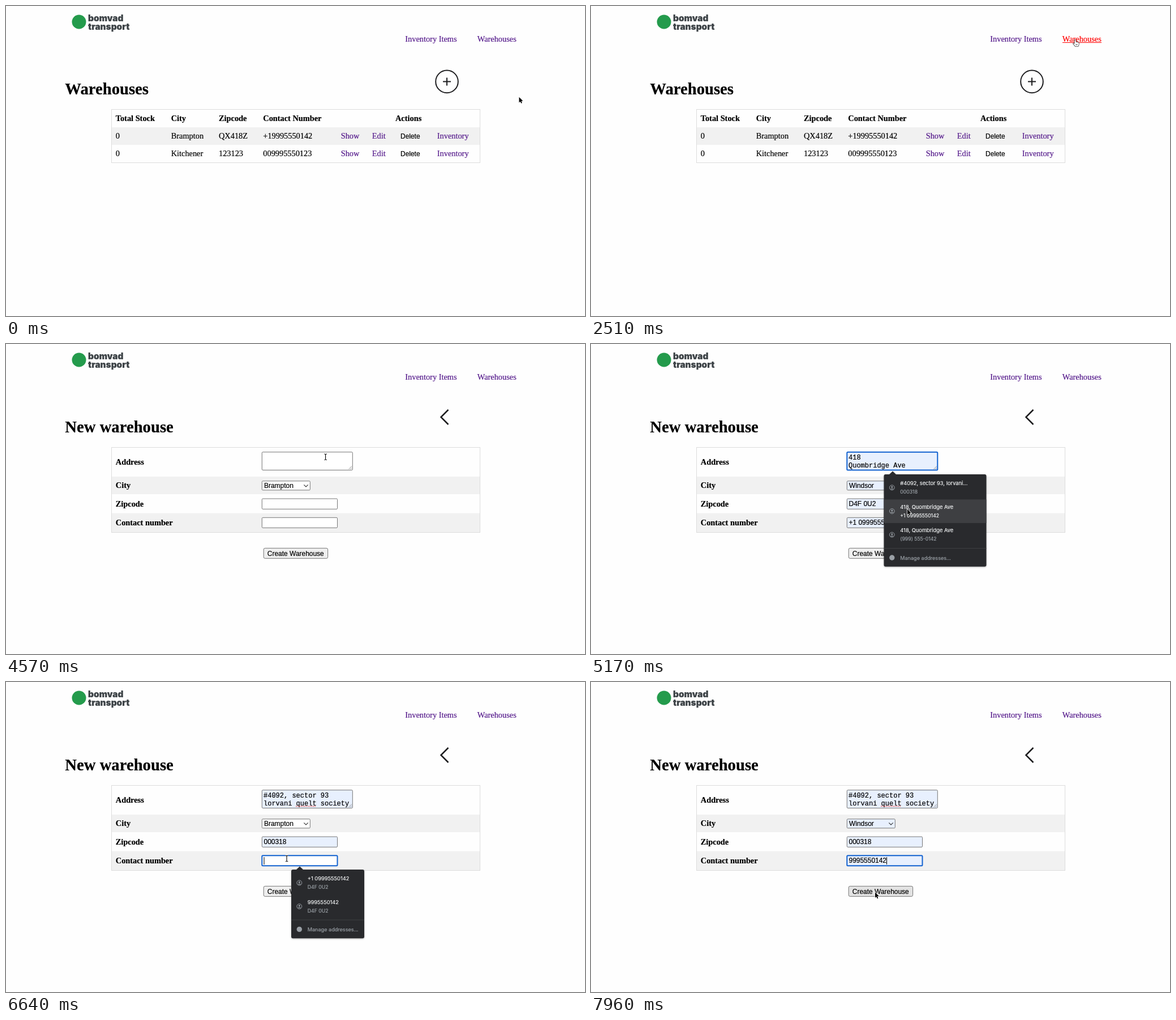
Write an HTML page with a canvas that moves like this. It is 1023x547 px and loops after 8 s.

```html
<!DOCTYPE html>
<html lang="en">
<head>
<meta charset="utf-8">
<title>Warehouses</title>
<style>
  html, body { margin: 0; width: 100%; height: 100%; overflow: hidden; background: #fefefe; }
  canvas { display: block; width: 1023px; height: 547px; }
</style>
</head>
<body>
<canvas id="stage" width="1023" height="547"></canvas>
<script>
const ctx = document.getElementById('stage').getContext('2d');
const LOOP = 8000;

const SERIF = '"Liberation Serif", "Times New Roman", serif';
const SANS = '"Liberation Sans", Arial, sans-serif';
const MONO = '"Liberation Mono", "Courier New", monospace';
const UI = 'Inter, Roboto, sans-serif';
const BODY = `14.35px ${SERIF}`;
const BOLD = `bold 14.35px ${SERIF}`;
const HEAD = `bold 28.7px ${SERIF}`;
const CONTROL = `11.96px ${SANS}`;
const CODE = `12px ${MONO}`;
const MARK = `900 15.4px ${UI}`;

const PURPLE = '#551a8b', GREY = '#9aa0a6', FILLED = '#e8f0fe', RING = '#1262d0', EDGE = '#767676';

// When things happen, in ms
const AT = {
  hand: 2070, linkHot: 2510, linkCool: 2655, form: 3840, focusAddress: 4723, popAddress: 4870,
  pickAddress: 6050, focusPhone: 6491, popPhone: 6640, pickPhone: 7522
};

// Cursor travel: start, end, number of steps, then a path of two or three points
const moves = [
  [900, 1920, 8, [906.5, 160.7], [776, 100], [855.5, 59.5]],
  [2655, 3090, 4, [855.5, 59.5], [776, 132.5]],
  [3987, 4576, 5, [776, 132.5], [540, 207]],
  [5020, 5166, 2, [540, 207], [559, 291.5]],
  [5312, 5750, 4, [559, 291.5], [551, 267]],
  [6197, 6491, 3, [551, 267], [496, 311.5]],
  [6787, 7080, 3, [496, 311.5], [530, 358]],
  [7230, 7376, 2, [530, 358], [528, 394]],
  [7668, 7960, 3, [528, 394], [502, 371]]
];

const people = [
  { title: '#4092, sector 93, lorvani...', note: '000318', lines: ['#4092, sector 93', 'lorvani quelt society'],
    city: 'Brampton', zip: '000318', phone: '' },
  { title: '418, Quombridge Ave', note: '+1 09995550142', lines: ['418', 'Quombridge Ave'],
    city: 'Windsor', zip: 'D4F 0U2', phone: '+1 09995550142' },
  { title: '418, Quombridge Ave', note: '(999) 555-0142', lines: ['418', 'Quombridge Ave'],
    city: 'Windsor', zip: 'D4F 0U2', phone: '(999) 555-0142' }
];
const phones = [
  { title: '+1 09995550142', note: 'D4F 0U2' },
  { title: '9995550142', note: 'D4F 0U2' }
];
const addressPop = { x: 517.5, y: 230, w: 181, tip: 533, items: people };
const phonePop = { x: 504, y: 331, w: 129, tip: 519, items: phones };
const ITEM = 41.6;

// The hairline stroke gives the slightly heavier look of smoothed type
function text(str, x, y, font, color = '#000', align = 'left') {
  ctx.font = font;
  ctx.fillStyle = ctx.strokeStyle = color;
  ctx.textAlign = align;
  ctx.lineWidth = 0.2;
  ctx.fillText(str, x, y);
  ctx.strokeText(str, x, y);
}

function rect(x, y, w, h, color) {
  ctx.fillStyle = color;
  ctx.fillRect(x, y, w, h);
}

function line(points, color, width) {
  ctx.beginPath();
  points.forEach(([x, y]) => ctx.lineTo(x, y));
  ctx.strokeStyle = color;
  ctx.lineWidth = width;
  ctx.stroke();
}

function disc(x, y, r, color) {
  ctx.beginPath();
  ctx.arc(x, y, r, 0, Math.PI * 2);
  ctx.fillStyle = color;
  ctx.fill();
}

function ring(x, y, r, color, width) {
  ctx.beginPath();
  ctx.arc(x, y, r, 0, Math.PI * 2);
  ctx.strokeStyle = color;
  ctx.lineWidth = width;
  ctx.stroke();
}

function box(x, y, w, h, fill, focused = false, radius = 1.5) {
  ctx.beginPath();
  ctx.roundRect(x, y, w, h, radius);
  ctx.fillStyle = fill;
  ctx.fill();
  ctx.strokeStyle = focused ? RING : EDGE;
  ctx.lineWidth = focused ? 2 : 1;
  ctx.stroke();
}

const inside = (p, x, y, w, h) => p.x >= x && p.x <= x + w && p.y >= y && p.y <= y + h;

function cursorAt(t) {
  const move = moves.filter(m => t >= m[0]).pop();
  if (!move) return { x: moves[0][3][0], y: moves[0][3][1] };
  const [start, end, steps, a, ...rest] = move;
  const b = rest[rest.length - 1];
  const c = rest.length > 1 ? rest[0] : [(a[0] + b[0]) / 2, (a[1] + b[1]) / 2];
  const step = (end - start) / (steps - 1);
  const k = Math.min(1, (Math.floor((t - start) / step + 1e-6) + 1) / steps);
  const u = k * k * (3 - 2 * k), v = 1 - u;
  const mix = i => v * v * a[i] + 2 * u * v * c[i] + u * u * b[i];
  return { x: mix(0), y: mix(1) };
}

function hovered(pop, p) {
  if (p.x < pop.x || p.x > pop.x + pop.w) return -1;
  const i = Math.floor((p.y - pop.y - 2.7) / ITEM);
  return i >= 0 && i < pop.items.length ? i : -1;
}

function drawHeader(hot) {
  disc(129, 28, 12.5, '#249b4c');
  text('bomvad', 145, 27, MARK, '#3d4347');
  text('transport', 145, 41.5, MARK, '#3d4347');
  text('Inventory Items', 705.3, 62.7, BODY, PURPLE);
  text('Warehouses', 832.8, 62.7, BODY, hot ? '#f00' : PURPLE);
  if (hot) rect(833, 64, 69, 1, '#f00');
}

function drawTable(bottom, bands) {
  bands.forEach(([y, h]) => rect(186, y, 652, h, '#f1f1f1'));
  ctx.strokeStyle = '#dcdcdc';
  ctx.lineWidth = 1;
  ctx.strokeRect(186.5, 182.5, 651, bottom - 182.5);
}

function drawList() {
  text('Warehouses', 104.3, 156, HEAD);
  ring(779, 133.4, 19.8, '#1d1d1f', 2);
  line([[772, 133.4], [786, 133.4]], '#1d1d1f', 2);
  line([[779, 126.4], [779, 140.4]], '#1d1d1f', 2);

  drawTable(276.5, [[214, 31]]);
  const columns = [193.7, 291.7, 376, 454.3];
  ['Total Stock', 'City', 'Zipcode', 'Contact Number'].forEach((s, i) => text(s, columns[i], 203.2, BOLD));
  text('Actions', 688, 203.2, BOLD);

  const rows = [['0', 'Brampton', 'QX418Z', '+19995550142'], ['0', 'Kitchener', '123123', '009995550123']];
  rows.forEach((row, r) => {
    const y = 234.3 + r * 31;
    row.forEach((s, i) => text(s, columns[i], y, BODY));
    text('Show', 591.7, y, BODY, PURPLE);
    text('Edit', 646.8, y, BODY, PURPLE);
    text('Delete', 697, y, CONTROL);
    text('Inventory', 761.8, y, BODY, PURPLE);
  });
}

function caret(x, y) {
  rect(x, y, 1, 13, '#000');
}

function squiggle(x0, x1, y) {
  for (let x = x0; x < x1; x += 3) disc(x + 1, y, 0.9, '#e8453c');
}

function drawForm(t, p, entry, phone, city, preview) {
  text('New warehouse', 104.3, 156, HEAD);
  line([[781.5, 116], [768.5, 129], [781.5, 142]], '#1d1d1f', 2.5);

  drawTable(332.5, [[234, 31], [298.5, 33.5]]);
  [['Address', 213.3], ['City', 254.3], ['Zipcode', 286.5], ['Contact number', 319.8]]
    .forEach(([s, y]) => text(s, 193.8, y, BOLD));

  const onAddress = t >= AT.focusAddress && t < AT.focusPhone;
  const onPhone = t >= AT.focusPhone;
  const lines = entry ? entry.lines : [];

  box(452.3, 190.7, 160, 31.8, entry ? FILLED : '#fff', onAddress);
  lines.forEach((s, i) => text(s, 455, 204.3 + i * 13.6, CODE));
  line([[605.5, 221], [611, 215.5]], '#777', 0.8);
  line([[608.5, 221], [611, 218.5]], '#777', 0.8);
  if (t >= AT.pickAddress) squiggle(512, 547, 219.3);
  if (onAddress && !preview) caret(entry ? 606 : 456, entry ? 207 : 194);

  box(452.3, 241.8, 85, 16, city === 'Windsor' ? FILLED : '#fff');
  text(city, 456, 254.2, CONTROL);
  line([[526.3, 248.3], [530, 251.9], [533.7, 248.3]], '#333', 1.1);

  box(452.3, 273, 133.2, 18.3, entry ? FILLED : '#fff');
  if (entry) text(entry.zip, 455.5, 286.3, CONTROL);

  box(452.3, 306.3, 133.2, 18, phone ? FILLED : '#fff', onPhone);
  text(phone, 455.5, 319.4, CONTROL);
  if (onPhone && !preview) caret(455.5 + ctx.measureText(phone).width, 309);

  const over = inside(p, 455, 360, 114, 19);
  box(455.2, 360.3, 113.4, 18, over ? '#e3e3e3' : '#efefef', false, 2.5);
  text('Create Warehouse', 511.8, 373.5, CONTROL, '#000', 'center');
}

function avatar(x, y) {
  ring(x, y, 4.4, GREY, 1);
  disc(x, y - 1.2, 1.5, GREY);
  ctx.beginPath();
  ctx.ellipse(x, y + 2.8, 2.9, 1.5, 0, Math.PI, 0);
  ctx.fill();
}

function drawPopup({ x, y, w, tip, items }, hot) {
  const foot = items.length * ITEM;
  ctx.save();
  ctx.shadowColor = 'rgba(0,0,0,.3)';
  ctx.shadowBlur = 3;
  ctx.shadowOffsetY = 1;
  ctx.beginPath();
  ctx.roundRect(x, y, w, foot + 38, 3);
  ctx.moveTo(tip - 6.5, y + 0.5);
  ctx.lineTo(tip, y - 5.5);
  ctx.lineTo(tip + 6.5, y + 0.5);
  ctx.fillStyle = '#292a2d';
  ctx.fill();
  ctx.restore();

  items.forEach((item, i) => {
    const top = y + i * ITEM;
    if (i === hot) rect(x, top + 2.7, w, ITEM, '#3e3f42');
    avatar(x + 14.3, top + 23.4);
    text(item.title, x + 28.8, top + 19, `9.3px ${UI}`, '#f1f3f4');
    text(item.note, x + 28.8, top + 34.2, `8.7px ${UI}`, i === hot ? '#f1f3f4' : GREY);
  });
  rect(x, y + foot + 5.2, w, 1, '#3e3f42');
  disc(x + 14.3, y + foot + 22.2, 4.7, GREY);
  text('Manage addresses...', x + 28.8, y + foot + 25.8, `9.1px ${UI}`, GREY);
}

const ARROW = new Path2D('M0 0V10.5L2.4 8.3 4 12 5.8 11.2 4.2 7.6 7.4 7.4Z');
const HAND = new Path2D('M-1.2 1Q0-.8 1.2 1L1.3 4.5Q3 3.7 3.4 5 5 4.3 5.4 5.6 7 5.2 7 7L6.6 10 5.6 12.5H0L-1 10.8-3.8 7.6Q-3.8 6.2-2.4 6.6L-1.2 8Z');
const BEAM = new Path2D('M-2.3-5.2Q0-5.2 0-4 0-5.2 2.3-5.2M0-4V4M-2.3 5.2Q0 5.2 0 4 0 5.2 2.3 5.2');

function drawCursor(kind, { x, y }) {
  ctx.save();
  ctx.translate(x, y);
  ctx.lineJoin = 'round';
  if (kind === 'beam') {
    ctx.strokeStyle = '#fff';
    ctx.lineWidth = 2.2;
    ctx.stroke(BEAM);
    ctx.strokeStyle = '#000';
    ctx.lineWidth = 1.1;
    ctx.stroke(BEAM);
  } else {
    const hand = kind === 'hand';
    const path = hand ? HAND : ARROW;
    ctx.scale(0.93, 0.93);
    ctx.strokeStyle = hand ? '#000' : '#fff';
    ctx.lineWidth = hand ? 1.3 : 1.6;
    ctx.stroke(path);
    ctx.fillStyle = hand ? '#fff' : '#000';
    ctx.fill(path);
    if (hand) {
      line([[1.6, 8], [1.6, 10.6]], '#000', 0.7);
      line([[3.6, 8], [3.6, 10.6]], '#000', 0.7);
    }
  }
  ctx.restore();
}

function cursorKind(t, p, pop) {
  if (pop && inside(p, pop.x, pop.y, pop.w, pop.items.length * ITEM + 38)) return 'arrow';
  if (t >= AT.hand && inside(p, 832, 50, 71, 17)) return 'hand';
  if (t < AT.form) return t >= AT.linkCool && Math.hypot(p.x - 779, p.y - 133.4) < 21 ? 'hand' : 'arrow';
  if (inside(p, 764, 113, 24, 32)) return 'hand';
  const overField = inside(p, 452, 190, 161, 33) || inside(p, 452, 273, 134, 19) || inside(p, 452, 306, 134, 19);
  return overField ? 'beam' : 'arrow';
}

function draw(t) {
  const p = cursorAt(t);
  rect(0, 0, 1023, 547, '#fefefe');
  drawHeader(t >= AT.linkHot && t < AT.linkCool);

  let pop = null;
  if (t >= AT.popAddress && t < AT.pickAddress) pop = addressPop;
  if (t >= AT.popPhone && t < AT.pickPhone) pop = phonePop;

  if (t < AT.form) {
    drawList();
  } else {
    const hot = pop ? hovered(pop, p) : -1;
    let entry = t >= AT.pickAddress ? people[0] : null;
    let phone = t >= AT.pickPhone ? phones[1].title : '';
    let city = phone ? 'Windsor' : 'Brampton';
    if (hot >= 0 && pop === addressPop) {
      entry = people[hot];
      ({ city, phone } = entry);
    } else if (hot >= 0) {
      phone = phones[hot].title;
      city = 'Windsor';
    }
    drawForm(t, p, entry, phone, city, hot >= 0);
    if (pop) drawPopup(pop, hot);
  }
  drawCursor(cursorKind(t, p, pop), p);
}

const begin = performance.now();
function tick() {
  draw((performance.now() - begin) % LOOP);
  requestAnimationFrame(tick);
}
tick();
</script>
</body>
</html>
```
